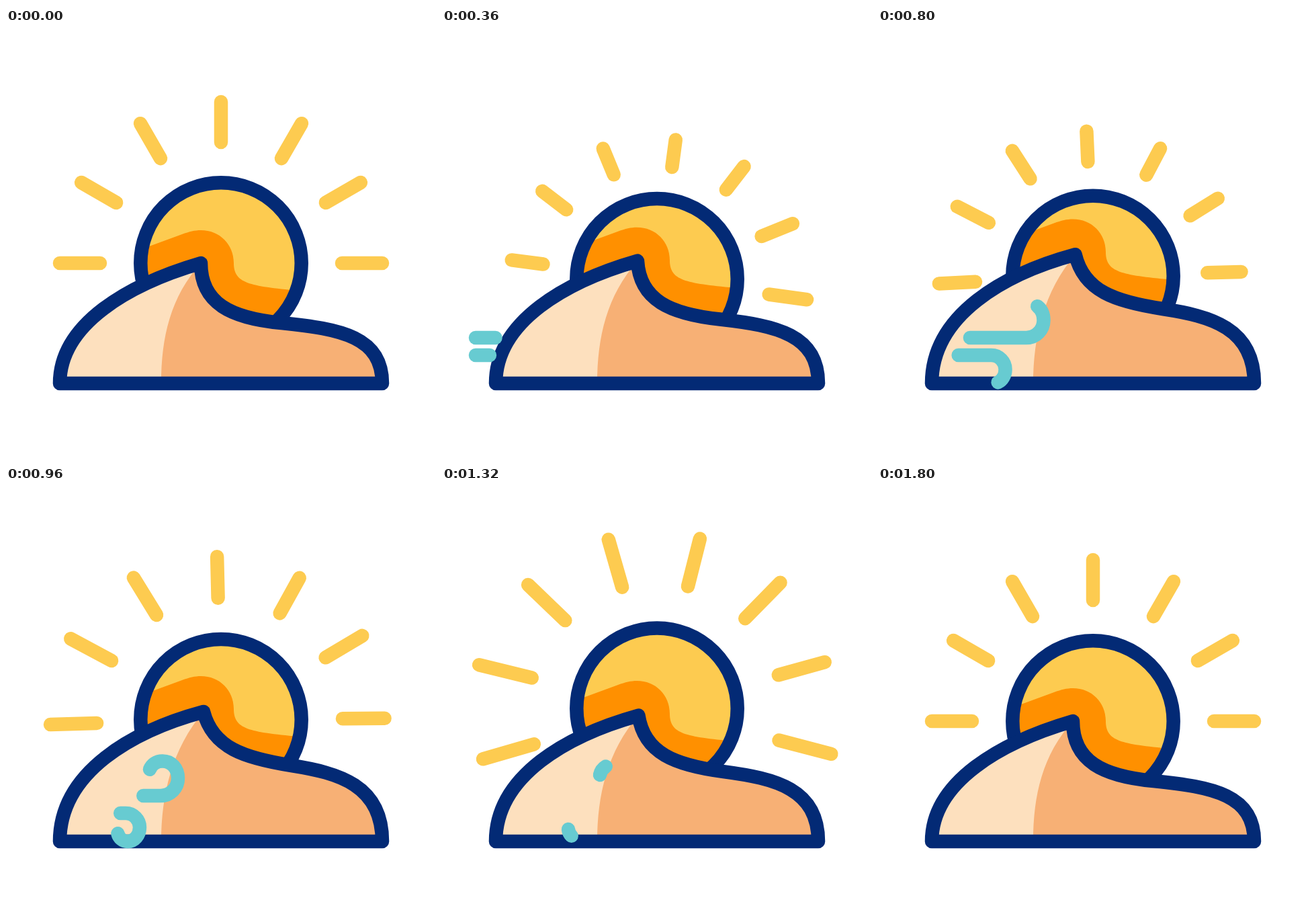
Animation of 640 by 640 pixels, one loop 2 s. Source, as an HTML page with a canvas:

```html
<!DOCTYPE html>
<html lang="en">
<head>
<meta charset="utf-8">
<title>Desert sun</title>
<style>
  html, body { margin: 0; width: 100%; height: 100%; overflow: hidden; background: #fff; }
  canvas { display: block; width: 100vmin; height: 100vmin; }
</style>
</head>
<body>
<canvas id="stage" width="640" height="640"></canvas>
<script>
const ctx = document.getElementById('stage').getContext('2d');
const NAVY = '#032a75', YELLOW = '#fdcb50', ORANGE = '#ff9000';
const LIGHT = '#fde0be', TAN = '#f7b075', TEAL = '#67cbd1';
const LOOP = 2000, STEP = 40, HOLD = 80, LAST = 43;

const clamp01 = v => Math.max(0, Math.min(1, v));
const lerp = (a, b, p) => a + (b - a) * p;
const ease = p => p * p * (3 - 2 * p);
const linear = p => p;
const span = (n, from, to) => clamp01((n - from) / (to - from));

// Value at step n of a track of knots and values.
function track(n, knots, values, curve = linear) {
  let i = 0;
  while (i < knots.length - 2 && n > knots[i + 1]) i++;
  return lerp(values[i], values[i + 1], curve(span(n, knots[i], knots[i + 1])));
}

function stroke(path, color) {
  ctx.strokeStyle = color;
  ctx.stroke(path);
}

function fill(path, color) {
  ctx.fillStyle = color;
  ctx.fill(path);
}

// Extra reach of each ray at the knots, by its resting angle from the top.
const KNOTS = [0, 7, 14, 22, 31, 35, LAST];
const RAYS = [
  [-120, [0, 9, 16, 11.5, 9, 5.5, 0]],
  [-90, [0, 8, 11.5, 11.5, 12, 7, 0]],
  [-60, [0, 5, 7, 5.5, 5.3, 2.5, 0]],
  [-30, [0, 0, 0.5, 0, 1, 0.5, 0]],
  [0, [0, -1, 0, -1.5, 0, -0.5, 0]],
  [30, [0, 1.7, 4.4, 2, 1.6, 1, 0]],
  [60, [0, 8, 9, 1, -1.6, -1, 0]],
  [90, [0, 15, 16, 9, 7.3, 4.8, 0]]
];

function drawRays(n, drop, rise) {
  const turn = n < 21
    ? 29.4 * ease(n / 21)
    : 29.4 * (1 - ease(Math.pow(span(n, 21, LAST), 0.85)));
  const inner = 180 - drop * (drop > 0 ? 0.5 : 0.4);
  const outer = 240 - drop * (drop > 0 ? 1.26 : 1.1);
  const path = new Path2D();
  for (const [angle, extra] of RAYS) {
    const reach = track(n, KNOTS, extra);
    const fan = 0.7 * rise * Math.sin(angle * Math.PI / 180);
    const a = (angle + turn + fan) * Math.PI / 180;
    const at = r => [320 + r * Math.sin(a), 350 + drop - r * Math.cos(a)];
    path.moveTo(...at(inner + (angle < 0 ? reach * 0.35 : 0)));
    path.lineTo(...at(outer + reach));
  }
  stroke(path, YELLOW);
}

const SHADE = new Path2D('M180 337 L262 307 C273 303 281 301 290 301 ' +
  'C318 301 339 322 339 350 C339 380 362 384 435 391 L460 391 V560 H180 Z');

function drawSun(drop, rise) {
  const disc = new Path2D();
  disc.arc(320, 350 + drop, 119.7, 0, Math.PI * 2);
  fill(disc, YELLOW);
  ctx.save();
  ctx.clip(disc);
  ctx.translate(0, -18 * rise);
  fill(SHADE, ORANGE);
  ctx.restore();
  stroke(disc, NAVY);
}

function drawDune(rise) {
  const pt = (x0, y0, x1, y1) => [lerp(x0, x1, rise), lerp(y0, y1, rise)];
  const peak = pt(290, 350, 294, 336);
  const right = [
    [...pt(290, 410, 308, 390), ...pt(335, 432, 355, 405), ...pt(410, 439, 425, 416)],
    [...pt(500, 448, 495, 427), ...pt(560, 460, 560, 445), 560, 529]
  ];

  const outline = new Path2D();
  outline.moveTo(80, 529);
  outline.bezierCurveTo(...pt(80, 440, 80, 425), ...pt(184, 381, 190, 364), ...peak);
  right.forEach(c => outline.bezierCurveTo(...c));
  outline.closePath();

  const slope = new Path2D();
  slope.moveTo(...peak);
  right.forEach(c => slope.bezierCurveTo(...c));
  slope.lineTo(231, 529);
  slope.bezierCurveTo(231, 460, ...pt(245, 400, 247, 391), ...peak);

  fill(outline, LIGHT);
  fill(slope, TAN);
  stroke(outline, NAVY);
}

function gust(d, lift) {
  const el = document.createElementNS('http://www.w3.org/2000/svg', 'path');
  el.setAttribute('d', d);
  return { path: new Path2D(d), length: el.getTotalLength(), lift };
}

const GUSTS = [
  gust('M0 461 H143 C158 461 169 449 169 435 C169 420 159 409.5 146 409.5 C135 409.5 128 416 126 425', 5),
  gust('M0 487 H91 C103 487 112 497 112 508 C112 520 104 529 94 529 C86 529 80 523 79 515', -4)
];

function drawWind(n) {
  const head = ease(span(n, 2.5, 23.5));
  const tail = ease(span(n, 10.2, 34.8));
  if (head <= tail) return;
  const x = track(n, [3, 7, 14, 22, 31, 35], [46, 50, 68, 87, 109, 116]);
  for (const { path, length, lift } of GUSTS) {
    ctx.save();
    ctx.translate(x, lift * span(n, 22, 31));
    ctx.setLineDash([(head - tail) * length, length * 2]);
    ctx.lineDashOffset = -tail * length;
    stroke(path, TEAL);
    ctx.restore();
  }
}

function draw(ms) {
  const n = Math.max(0, Math.min(LAST, Math.floor((ms - HOLD) / STEP)));
  const drop = track(n, [0, 12, 28, LAST], [0, 38, -21, 0], ease);
  const rise = track(n, [0, 22, LAST], [0, 1, 0], ease);
  ctx.fillStyle = '#fff';
  ctx.fillRect(0, 0, 640, 640);
  ctx.lineWidth = 20.5;
  ctx.lineCap = ctx.lineJoin = 'round';
  drawRays(n, drop, rise);
  drawSun(drop, rise);
  drawDune(rise);
  drawWind(n);
}

const start = performance.now();
function tick() {
  draw((performance.now() - start) % LOOP);
  requestAnimationFrame(tick);
}
tick();
</script>
</body>
</html>
```
